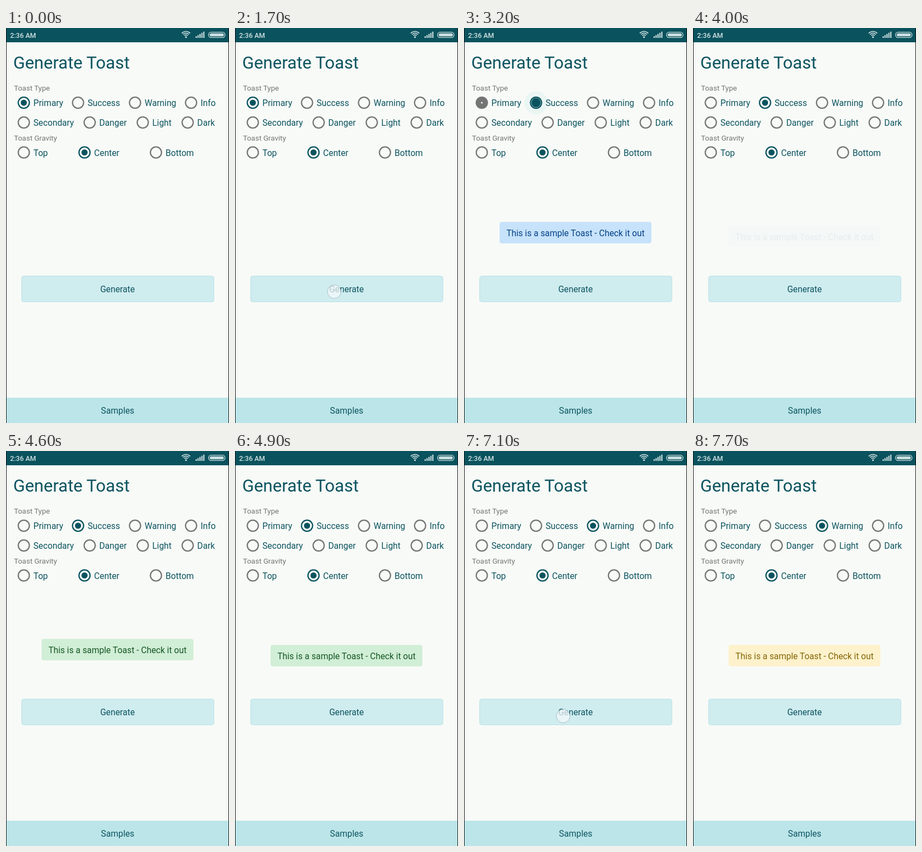
Write an HTML page that moves like this. It is 407 px wide and 719 px high and loops after 8 s.

```html
<!DOCTYPE html>
<html lang="en">
<head>
<meta charset="utf-8">
<title>Generate Toast</title>
<style>
  html, body { margin: 0; width: 100%; height: 100%; overflow: hidden; background: #f8faf7; }
  svg { display: block; width: 100%; height: 100%; }
  text { font-family: Roboto, sans-serif; font-size: 15.75px; fill: #0c5460; }
  .mid { text-anchor: middle; }
  .caption { font-size: 13.5px; fill: #757575; }
</style>
</head>
<body>
<svg id="stage" viewBox="0 0 407 719" xmlns="http://www.w3.org/2000/svg">
  <rect width="407" height="719" fill="#f8faf7"/>
  <rect width="407" height="26" fill="#0a525d"/>
  <text x="7.5" y="17.5" style="font-size:12.6px;font-weight:500;fill:#cfe2e4">2:36 AM</text>
  <g id="status" fill="none" stroke="#c9dee0" stroke-width="1.7">
    <circle cx="328.5" cy="16.6" r="1.7" fill="#c9dee0" stroke="none"/>
    <rect x="369.7" y="7.7" width="30" height="9.6" rx="4.5" stroke-width="1.3"/>
    <rect x="371.8" y="9.8" width="25.8" height="5.4" rx="2.6" fill="#c9dee0" stroke="none"/>
  </g>

  <text x="13.2" y="73.5" style="font-size:31.5px">Generate Toast</text>
  <text class="caption" x="14.5" y="114">Toast Type</text>
  <text class="caption" x="14.5" y="204.5">Toast Gravity</text>
  <g id="radios"></g>

  <rect x="28.5" y="451.5" width="351" height="47" rx="4" fill="#cfecef" stroke="#b9e3ea"/>
  <text class="mid" x="203.5" y="481.3">Generate</text>
  <rect y="673" width="407" height="46" fill="#bbe5e8"/>
  <text class="mid" x="203.8" y="702.3">Samples</text>

  <g id="toast">
    <rect x="65" y="353" width="277" height="39" rx="4"/>
    <text class="mid" x="203.5" y="379">This is a sample Toast - Check it out</text>
  </g>
  <circle id="touch" r="12.3" fill="#f4f8fa" fill-opacity=".72" stroke="#8fa9b4" stroke-opacity=".65"/>
  <path d="M.5 0V719M406.5 0V719" stroke="#101414"/>
</svg>
<script>
const LOOP = 8000, STEP = 100;
const TEAL = '#08535f', GREY = '#757575';
const OUTER = 11.25, HOLE = 9, DOT = 5.6;
const byId = id => document.getElementById(id);
const clamp = v => Math.max(0, Math.min(1, v));

function add(parent, tag, attrs, text) {
  const el = document.createElementNS('http://www.w3.org/2000/svg', tag);
  set(el, attrs);
  if (text) el.textContent = text;
  return parent.appendChild(el);
}

function set(el, attrs) {
  for (const key in attrs) el.setAttribute(key, attrs[key]);
}

// Status icons: wifi arcs and signal bars
for (const r of [4.4, 7.6, 10.8]) {
  const d = r * 0.72;
  add(byId('status'), 'path', { d: `M${328.5 - d} ${17 - r * 0.69}A${r} ${r} 0 0 1 ${328.5 + d} ${17 - r * 0.69}` });
}
for (let i = 0; i < 5; i++) {
  const h = 3 + i * 2.1;
  add(byId('status'), 'rect', { x: 346 + i * 3.5, y: 18 - h, width: 2.2, height: h, fill: '#c9dee0', stroke: 'none' });
}

const rows = [
  [136, ['Primary', 32.5], ['Success', 131.5], ['Warning', 235.5], ['Info', 337.8]],
  [172, ['Secondary', 32.5], ['Danger', 152.7], ['Light', 249.6], ['Dark', 331.6]],
  [226.5, ['Top', 32.5], ['Center', 143.3], ['Bottom', 273.7]]
];
const radios = {};
for (const [cy, ...items] of rows) {
  for (const [name, cx] of items) {
    const box = byId('radios'), at = { cx, cy };
    radios[name] = {
      ripple: add(box, 'circle', { ...at, r: 21, fill: '#4fc3d0', opacity: 0 }),
      ring: add(box, 'circle', { ...at, fill: 'none' }),
      dot: add(box, 'circle', at)
    };
    add(box, 'text', { x: cx + 17.5, y: cy + 6 }, name);
  }
}

function drawRadio(name, color, hole, dot) {
  const { ring, dot: core } = radios[name];
  set(ring, { r: (OUTER + hole) / 2, 'stroke-width': OUTER - hole, stroke: color });
  set(core, { r: dot, fill: color });
}

// Ring closes to a disc, then the disc shrinks to the dot
function turnOn(name, u) {
  if (u < 0.4) drawRadio(name, TEAL, HOLE * (1 - u / 0.4), 0);
  else drawRadio(name, TEAL, HOLE, HOLE + (DOT - HOLE) * (u - 0.4) / 0.6);
}

// Dot swells to a disc, then the disc opens into a ring
function turnOff(name, u) {
  if (u < 0.4) drawRadio(name, GREY, HOLE, DOT + (HOLE - DOT) * u / 0.4);
  else drawRadio(name, GREY, HOLE * (u - 0.4) / 0.6, 0);
}

const picks = [
  { from: 'Primary', to: 'Success', start: 3050 },
  { from: 'Success', to: 'Warning', start: 6150 }
];
const toasts = [
  { press: 1700, leave: 3720, fill: '#c7e2fb', ink: '#004085' },
  { press: 4300, leave: 6420, fill: '#d1eed6', ink: '#155724' },
  { press: 7100, leave: 9999, fill: '#fdf2cc', ink: '#856404' }
];
const touches = [
  [1700, 181, 480], [2900, 133, 138], [4300, 181, 475], [6000, 237, 138], [7100, 181, 482.5]
];

function drawPicks(t) {
  for (const name in radios) turnOff(name, 1);
  turnOn('Center', 1);
  if (t < picks[0].start) turnOn('Primary', 1);
  for (const { from, to, start } of picks) {
    const age = t - start, u = clamp(age / 300);
    const glow = age > 0 ? 0.1 * clamp((500 - age) / 400) : 0;
    radios[to].ripple.setAttribute('opacity', glow);
    if (age > 0) {
      turnOff(from, u);
      turnOn(to, u);
    }
  }
}

function overshoot(p) {
  const q = p - 1;
  return 1 + 4 * q ** 3 + 3 * q ** 2;
}

function drawToast(t) {
  const box = byId('toast');
  const it = toasts.find(o => t > o.press + 150 && t < o.leave + 300);
  if (!it) return set(box, { opacity: 0 });
  const age = t - it.press - 150, out = clamp((t - it.leave) / 300);
  const y = 56 * (1 - overshoot(clamp(age / 400))) + 7 * out;
  set(box, { opacity: clamp(age / 120) * (1 - out), transform: `translate(0 ${y})` });
  set(box.children[0], { fill: it.fill });
  box.children[1].style.fill = it.ink;
}

function drawTouch(t) {
  const hit = touches.find(([start]) => t >= start && t < start + 200);
  set(byId('touch'), hit ? { cx: hit[1], cy: hit[2], opacity: 1 } : { opacity: 0 });
}

function draw(time) {
  const t = Math.floor(time % LOOP / STEP) * STEP;
  drawPicks(t);
  drawToast(t);
  drawTouch(t);
}

const begin = performance.now();
function tick() {
  draw(performance.now() - begin);
  requestAnimationFrame(tick);
}
tick();
</script>
</body>
</html>
```
